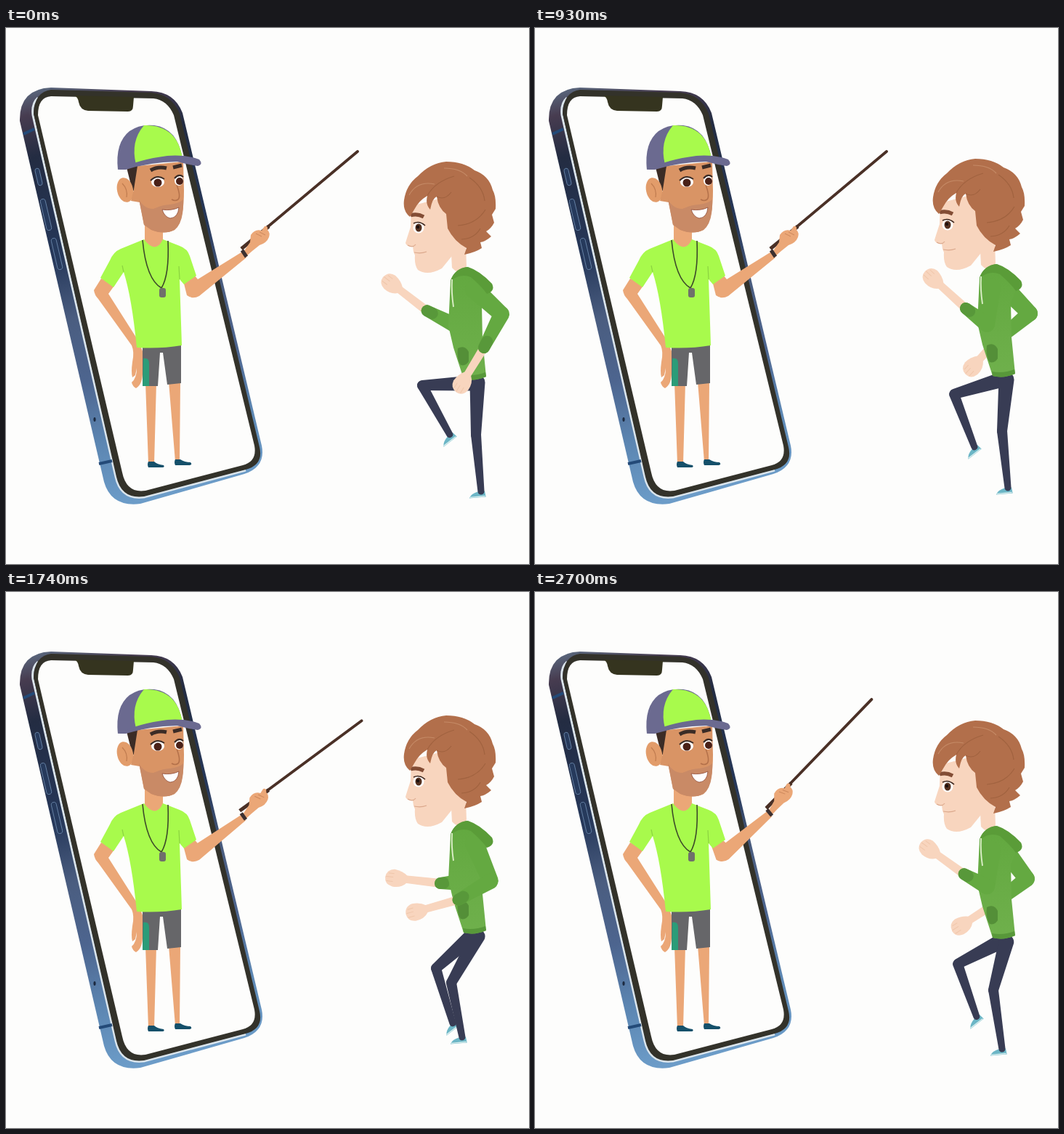
An HTML page for the animation above (2.73 s loop, 720 by 738 pixels).

```html
<!DOCTYPE html>
<html lang="en">
<head>
<meta charset="utf-8">
<title>Phone coach</title>
<style>
  html, body { margin: 0; width: 100%; height: 100%; overflow: hidden; background: #fdfdfc; }
  svg { display: block; width: 100%; height: 100%; }
</style>
</head>
<body>
<svg viewBox="0 0 720 738">
  <defs>
    <linearGradient id="metal" gradientUnits="userSpaceOnUse" x1="30" y1="84" x2="160" y2="655">
      <stop offset="0" stop-color="#5b6a80"/>
      <stop offset=".06" stop-color="#473c50"/>
      <stop offset=".16" stop-color="#232c42"/>
      <stop offset=".4" stop-color="#26385a"/>
      <stop offset=".55" stop-color="#4a5d80"/>
      <stop offset=".7" stop-color="#4d658f"/>
      <stop offset=".85" stop-color="#5c86b2"/>
      <stop offset="1" stop-color="#6c9cc8"/>
    </linearGradient>
    <linearGradient id="hoodie" x1="0" y1="0" x2="0" y2="1">
      <stop offset="0" stop-color="#62a83f"/>
      <stop offset="1" stop-color="#6fb04c"/>
    </linearGradient>
  </defs>

  <g id="phone">
    <path fill="url(#metal)" d="M19 128Q18 84 62 82L200 87Q232 88 243 117L352 575Q358 604 328 614L185 655Q145 660 135 625Z"/>
    <path fill="none" stroke="#dbe5ec" stroke-width="3" d="M44 96Q35 104 37 120L151 618Q158 650 190 646L330 609"/>
    <path fill="#33322a" d="M38 118Q39 88 62 85L200 89Q228 91 239 118L349 577Q355 601 330 608L190 645Q159 649 152 618Z"/>
    <path fill="#fdfdfc" d="M44 120Q44 95 62 94L203 97Q222 99 231 120L342 575Q346 597 326 602L192 637Q166 641 160 612Z"/>
    <path fill="#35341f" d="M94 93Q99 95 100 102Q102 113 113 114L168 115Q175 115 175 107L176 95Z"/>
    <path stroke="#234a78" stroke-width="4" d="M24 146l15-7M128 600l18-4"/>
    <g fill="#263a5c" stroke="#6f8cb0" stroke-width=".8">
      <rect x="-3" y="-12" width="6" height="24" rx="3" transform="translate(45 205) rotate(-13)"/>
      <rect x="-3.5" y="-22" width="7" height="44" rx="3.5" transform="translate(55 257) rotate(-13)"/>
      <rect x="-3.5" y="-22" width="7" height="44" rx="3.5" transform="translate(70 311) rotate(-13)"/>
    </g>
    <ellipse cx="122" cy="539" rx="1.6" ry="3" fill="#1c2a40"/>
  </g>

  <g id="coach">
    <g fill="#eba777">
      <path d="M192 488H207L204 600H196ZM224 487H240L239 597H233Z"/>
      <path d="M131 345L121 361Q122 368 127 373L173 437Q177 446 174 460Q172 474 174 481L178 478L180 468Q180 482 173 488Q174 493 179 496Q189 490 188 470L188 445L183 432L141 366L151 352Z"/>
      <path d="M191 270H216V296Q204 311 191 296Z"/>
    </g>
    <path fill="#15506a" d="M196 597H204Q208 601 217 602Q219 605 215 605H196Q194 601 196 597ZM233 594H240Q246 598 254 598Q257 601 253 602H233Q231 598 233 594Z"/>
    <path fill="#666669" d="M188 436H241V489L222 491L216 447H212L209 493H188Z"/>
    <path fill="#2b9c78" d="M189 455Q197 453 197 462V493H188Z"/>
    <g id="arm">
      <path fill="#eba777" d="M244 348L249 368Q257 374 266 369L331 316L327 307L264 346L259 340Z"/>
      <g id="stick">
        <path stroke="#4a3026" stroke-width="5" d="M324 304L362 273"/>
        <path stroke="#4a3026" stroke-width="3.8" stroke-linecap="round" d="M360 274L484 170"/>
      </g>
      <path fill="#eba777" d="M327 308L336 295L337 285Q343 276 352 279L356 273Q361 272 360 278Q364 282 362 288Q359 296 349 299L339 307L331 314Z"/>
      <path fill="none" stroke="#cc885c" stroke-width="1" d="M344 283L352 287M349 281L357 285"/>
      <path stroke="#3c3030" stroke-width="5" d="M325 306L331 315"/>
    </g>
    <path fill="#a8fa4c" d="M190 291L158 304Q148 308 143 320L130 344L148 357L162 336Q173 370 180 440Q212 442 242 437L239 346L245 353L262 341L253 314Q250 304 239 300L216 291Q206 312 190 291Z"/>
    <path fill="none" stroke="#8bd340" stroke-width="1.2" d="M162 336L160 327M239 346L238 328"/>
    <path fill="none" stroke="#3c4a2a" stroke-width="1.6" d="M188 292Q193 346 214 358Q225 340 223 293"/>
    <rect x="211" y="358" width="9" height="13" rx="3" fill="#6f706b"/>

    <path fill="#3b2c26" d="M165 188H185V224H174Z"/>
    <ellipse cx="164" cy="223" rx="11" ry="17" fill="#e29c6a" transform="rotate(-12 164 223)"/>
    <path fill="none" stroke="#c07c50" stroke-width="1.2" d="M160 214Q168 222 166 233"/>
    <path fill="#d99465" d="M181 190L244 184L245 224Q245 268 232 278Q218 285 200 278L190 271L184 240L172 238L176 222Z"/>
    <path fill="#c98a66" d="M183 236Q190 249 203 249Q216 243 226 243Q240 241 244 236Q245 268 232 278Q218 285 200 278L190 271Z"/>
    <path fill="#fff" stroke="#8e4a35" stroke-width=".8" d="M215 250Q228 252 238 247Q237 261 226 262Q218 260 215 250Z"/>
    <path fill="none" stroke="#b4714a" stroke-width="1.6" d="M235 216Q241 232 237 236Q233 239 228 236"/>
    <g fill="#fff"><ellipse cx="209" cy="212" rx="9" ry="7"/><ellipse cx="238" cy="210" rx="6" ry="7"/></g>
    <g fill="#4a2118"><circle cx="209" cy="213" r="5.5"/><circle cx="239" cy="211" r="5"/></g>
    <path fill="none" stroke="#3b2c26" stroke-width="2" d="M199 210Q208 201 218 208M232 207Q238 200 244 205"/>
    <path fill="none" stroke="#3b2c26" stroke-width="5" d="M199 196Q209 190 221 193M230 192L242 189"/>
    <path fill="#6b6a90" d="M154 195Q150 158 170 142Q184 132 204 134Q236 138 243 180L190 186Z"/>
    <path fill="#a8fa4c" d="M179 188Q171 156 190 134Q236 133 243 180Z"/>
    <path fill="#6b6a90" d="M154 195Q182 181 222 176Q247 174 266 181Q272 188 264 190Q250 188 236 184Q196 185 165 195Z"/>
  </g>

  <g id="runner"></g>
</svg>
<script>
const LOOP = 2730, STEP = 100 / 3, CYCLE = 18;
const $ = id => document.getElementById(id);
const mix = (a, b, k) => a.map((v, i) => v + (b[i] - v) * k);

const GREEN = '#64a941', CUFF = '#58983a', SKIN = '#f8d5be', PANTS = '#383c54', SHOE = '#6cb6c6';

// bob, back elbow, back cuff, back hand, front cuff, front hand,
// raised knee, raised ankle, standing knee, standing ankle
const pass  = [-4, 667,398, 622,424, 565,440, 598,401, 537,394, 592,518, 615,594, 613,538, 628,613];
const push  = [0,  673,396, 629,433, 582,459, 590,399, 533,382, 584,512, 611,584, 627,543, 640,626];
const plant = [10, 682,394, 658,440, 628,489, 579,389, 531,352, 573,492, 611,560, 647,560, 654,638];
const lift  = [3,  677,395, 632,430, 587,459, 590,388, 543,354, 582,512, 608,585, 631,548, 643,629];
const low   = [6,  681,393, 634,432, 603,466, 593,386, 548,345, 577,504, 605,577, 643,555, 651,633];
const rise  = [7,  674,402, 632,432, 581,459, 595,401, 539,375, 576,501, 604,574, 638,555, 647,634];

// limbs meet halfway before they trade places
const mid = (a, b) => [(pass[a] + pass[b]) / 2, (pass[a + 1] + pass[b + 1]) / 2];
const cuff = mid(3, 7), hand = mid(5, 9), knee = mid(11, 15), ankle = mid(13, 17);
const cross = [-6, 655, 402, ...cuff, ...hand, ...cuff, ...hand, ...knee, ...ankle, ...knee, ...ankle];

const run = [[0, plant], [1, low], [3, rise], [4, push], [5, pass], [6, cross], [7, pass], [8, push], [9, lift],
  [10, low], [12, rise], [13, push], [14, pass], [15, cross], [16, pass], [17, push], [18, plant]];
// forearm turn, pointer turn, in degrees
const point = [[0, [0, 0]], [17, [-.5, 3.2]], [28, [0, 0]], [35, [0, 0]], [52, [-1.2, 3.5]], [66, [-3, 2.9]], [81, [-5.5, -6]]];

function sample(keys, t, ease = k => k) {
  let i = 0;
  while (i < keys.length - 2 && t >= keys[i + 1][0]) i++;
  const [t0, a] = keys[i], [t1, b] = keys[i + 1];
  return mix(a, b, ease((t - t0) / (t1 - t0)));
}
const smooth = k => k * k * (3 - 2 * k);

// rounded limb from a to b with end radii ra, rb
function limb(a, b, ra, rb, fill) {
  const dx = b[0] - a[0], dy = b[1] - a[1], len = Math.hypot(dx, dy) || 1;
  const nx = -dy / len, ny = dx / len;
  const at = (p, r) => `${(p[0] + nx * r).toFixed(1)} ${(p[1] + ny * r).toFixed(1)}`;
  return `<path fill="${fill}" d="M${at(a, ra)}L${at(b, rb)}A${rb} ${rb} 0 0 0 ${at(b, -rb)}L${at(a, -ra)}A${ra} ${ra} 0 0 0 ${at(a, ra)}Z"/>`;
}

function arm(shoulder, elbow, cuff, hand) {
  const turn = Math.atan2(hand[1] - cuff[1], hand[0] - cuff[0]) * 180 / Math.PI;
  const edge = mix(cuff, elbow, .18);
  return limb(cuff, hand, 6, 5, SKIN) +
    `<g transform="translate(${hand}) rotate(${turn})"><path fill="${SKIN}" d="M-15 -5Q-8 -13 4 -12Q15 -10 15 0Q14 11 3 12Q-8 11 -15 5Z"/>` +
    `<path fill="none" stroke="#efc6aa" d="M4 -5H13M4 1H14M3 6H11"/></g>` +
    limb(shoulder, elbow, 13, 11, GREEN) + limb(elbow, cuff, 11, 8, GREEN) + limb(edge, cuff, 8, 8, CUFF);
}

function leg(hip, knee, ankle, tilt) {
  return `<path fill="${SHOE}" transform="translate(${ankle}) rotate(${tilt})" d="M5 0L6 8H-17Q-14 2 -4 0Z"/>` +
    `<path stroke="#d8eeee" stroke-width="1.4" transform="translate(${ankle}) rotate(${tilt})" d="M-16 7H5"/>` +
    limb(hip, knee, 10.5, 7, PANTS) + limb(knee, ankle, 7, 4.5, PANTS);
}

const torso = `
  <path fill="${SKIN}" d="M611 265H632L634 318Q624 332 614 320Z"/>
  <path fill="url(#hoodie)" d="M612 338Q616 324 634 319L652 328L664 350L655 372L656 420L661 470Q645 477 630 473L616 430L609 400Z"/>
  <path fill="${CUFF}" d="M629 467Q645 470 660 464L661 470Q645 477 630 473Z"/>
  <path fill="#548f38" d="M622 431Q632 426 637 436V449Q633 456 626 454Q620 446 622 431Z"/>`;

const head = `
  <path fill="#5a9c38" d="M612 338Q618 320 636 319Q652 324 669 342Q674 352 662 356Q655 346 640 333Q626 327 612 338Z"/>
  <path fill="none" stroke="#dff0cc" stroke-width="1.8" d="M614 336Q613 354 616 374"/>
  <path fill="${SKIN}" d="M558 235L557 264Q552 279 550 286Q551 291 560 291L561 298L563 303Q562 316 567 323Q580 332 600 321L613 305L625 292L615 220Z"/>
  <path fill="none" stroke="#dba88c" stroke-width="1.2" d="M562 299Q571 301 579 298M553 289Q560 293 564 288"/>
  <ellipse cx="568" cy="265" rx="7.5" ry="7.5" fill="#fff"/>
  <ellipse cx="568" cy="265" rx="4.5" ry="5.5" fill="#54301f"/>
  <circle cx="567" cy="264" r="2.2" fill="#1d100d"/>
  <path fill="none" stroke="#3a241c" stroke-width="1.6" d="M561 259Q569 255 577 262"/>
  <path fill="none" stroke="#834d35" stroke-width="5" d="M557 248Q566 245 575 250"/>
  <path fill="#b26f4b" d="M556 250Q546 242 548 227Q551 206 567 194Q584 176 606 174Q630 174 645 186Q665 193 670 213Q675 222 674 239L669 247L672 258Q668 266 661 270L668 277Q660 284 653 285L655 293Q646 299 631 302L634 293Q617 284 608 266L606 246Q595 238 593 222Q587 224 584 240Q577 233 580 221Q568 228 562 240Z"/>
  <path fill="none" stroke="#a0623f" stroke-width="1.2" d="M580 221Q590 202 617 194M593 222Q604 228 613 216M622 262Q648 260 660 240M627 281Q645 280 653 266M638 196Q657 209 659 228"/>
  <path fill="none" stroke="#c58a66" stroke-width="1.2" d="M555 220Q566 200 590 205M603 183Q625 183 635 194"/>`;

function render(ms) {
  const n = Math.min(81, Math.floor((ms % LOOP + 4) / STEP));
  const [turn, tip] = sample(point, n, smooth);
  $('arm').setAttribute('transform', `rotate(${turn} 256 362)`);
  $('stick').setAttribute('transform', `rotate(${tip - turn} 340 291)`);

  const phase = n % CYCLE, p = sample(run, phase), dy = p[0];
  const at = i => [p[i], p[i + 1]];
  const back = arm([645, 350 + dy], at(1), at(3), at(5));
  const front = arm([628, 352 + dy], [622, 403 + dy * .8], at(7), at(9));
  const backIsNear = phase < 6 || phase >= 15;
  const [far, near] = backIsNear ? [front, back] : [back, front];
  const body = part => `<g transform="translate(0 ${dy})">${part}</g>`;
  $('runner').innerHTML = far +
    leg([640, 479 + dy], at(11), at(13), -38) +
    leg([649, 478 + dy], at(15), at(17), -5) +
    body(torso) + near + body(head);
}

function tick() {
  render(performance.now());
  requestAnimationFrame(tick);
}
tick();
</script>
</body>
</html>
```
